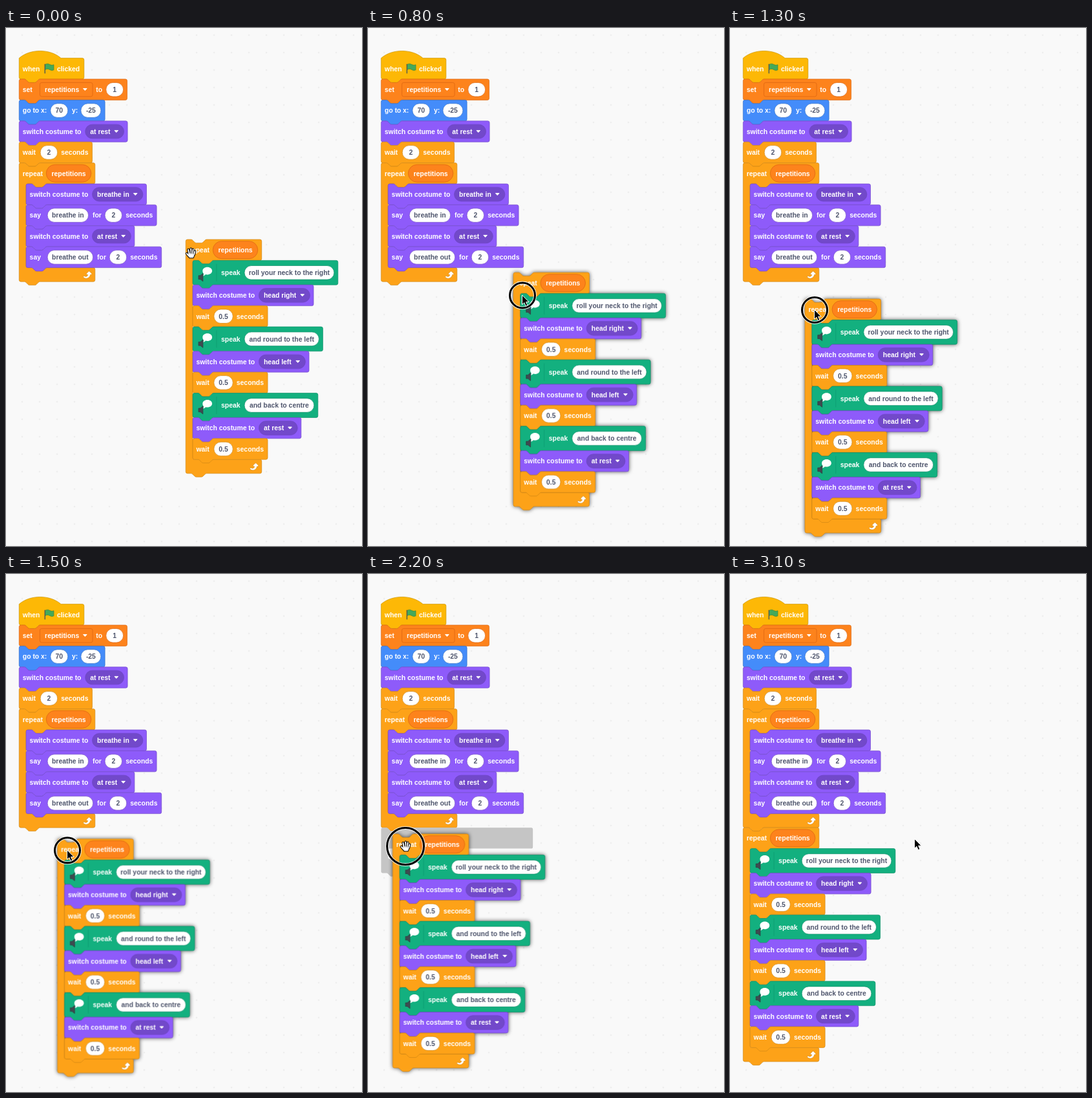
An HTML page that plays this animation: 551x801 px, repeating every 3700 ms.

```html
<!DOCTYPE html>
<html lang="en">
<head>
<meta charset="utf-8">
<title>Block scripts</title>
<style>
html, body { margin: 0; width: 100%; height: 100%; overflow: hidden; background: #f9f9f9; }
svg { display: block; width: 551px; height: 801px; }
text { font: bold 10.4px "Liberation Sans", Arial, sans-serif; fill: #fff; }
.dark { fill: #4f566d; }
.mid { text-anchor: middle; }
.lifted { filter: drop-shadow(0 0 3px rgba(0,0,0,.65)); }
</style>
</head>
<body>
<svg id="stage" viewBox="0 0 551 801" xmlns="http://www.w3.org/2000/svg"></svg>
<script>
const LOOP = 3700, STEP = 100, SCALE = 0.675;
const ROW = 48 * SCALE, TALL = 56 * SCALE, FOOT = 32 * SCALE, INDENT = 16 * SCALE;

// fill, outline
const colors = {
  event: ['#fdb806', '#c99200'],
  data: ['#fd831c', '#da6410'],
  motion: ['#448cfa', '#306dc6'],
  looks: ['#8e5bfa', '#7048c8'],
  control: ['#fda218', '#cf8616'],
  voice: ['#13b07f', '#0b8c66']
};

// Block outlines, in block units
const notchIn = 'c2,0 3,1 4,2l4,4c1,1 2,2 4,2h12c2,0 3,-1 4,-2l4,-4c1,-1 2,-2 4,-2';
const notchOut = 'c-2,0 -3,1 -4,2l-4,4c-1,1 -2,2 -4,2h-12c-2,0 -3,-1 -4,-2l-4,-4c-1,-1 -2,-2 -4,-2';
const topEdge = `M0,4A4,4 0 0,1 4,0H12${notchIn}`;
const hatEdge = 'M0,0c25,-22 71,-22 96,0';
const rightSide = (w, h) => `H${w - 4}a4,4 0 0,1 4,4v${h - 8}a4,4 0 0,1 -4,4`;
const bottomEdge = `H48${notchOut}H4a4,4 0 0,1 -4,-4z`;
const stackPath = (w, h, top = topEdge) => top + rightSide(w, h) + bottomEdge;
const loopPath = (w, mouth) => topEdge + rightSide(w, 48) +
  `H64${notchOut}h-8a4,4 0 0,0 -4,4v${mouth - 8}a4,4 0 0,0 4,4` +
  rightSide(w, 32) + bottomEdge;

const shape = (d, [fill, line]) =>
  `<path d="${d}" transform="scale(${SCALE})" fill="${fill}" stroke="${line}"/>`;
const at = (x, y, body) => `<g transform="translate(${x} ${y})">${body}</g>`;
const label = (x, s, cls = '') => `<text x="${x}" y="3.7" class="${cls}">${s}</text>`;
const capsule = (x, w, h, [fill, line], r = h / 2) =>
  `<rect x="${x}" y="${-h / 2}" width="${w}" height="${h}" rx="${r}" fill="${fill}" stroke="${line}" stroke-width=".7"/>`;
const input = (x, w, s, kind) =>
  capsule(x, w, 21.6, ['#fff', colors[kind][1]]) + label(x + w / 2, s, 'dark mid');
const caret = x =>
  `<path d="M${x - 2.8},-1.6h5.6l-2.8,3z" fill="#fff" stroke="#fff" stroke-linejoin="round"/>`;
const menu = (x, w, s, look, r) =>
  capsule(x, w, 21.6, look, r) + label(x + 7.6, s) + caret(x + w - 11.7);

const block = (kind, w, body, h = ROW, top) => ({
  h, svg: shape(stackPath(w / SCALE, h / SCALE, top), colors[kind]) + at(0, h / 2, body)
});

function stack(blocks) {
  let y = 0, svg = '';
  for (const b of blocks) {
    svg += at(0, y, b.svg);
    y += b.h;
  }
  return { h: y, svg };
}

const flag = '<path d="M40.2-6.2c3-2 5.4-1.2 7.4 0 2 1 4 1.1 6 .2v8c-2 1-4 .8-6-.2-2-1.2-4.4-2-7.4 0z" fill="#45a95a" stroke="#3d8a3c" stroke-width=".8"/>' +
  '<path d="M40-6.6V7" stroke="#4f5b50" stroke-width="1.4" stroke-linecap="round"/>';
const turn = '<path transform="scale(.675)" fill="#fff" stroke="#cf8616" stroke-width=".9" d="M23.3,11c-.3,.6-.9,1-1.5,1h-1.6c-.1,1.3-.5,2.5-1.1,3.6c-.9,1.7-2.3,3.2-4.1,4.1c-1.7,.9-3.6,1.2-5.5,.9c-1.8-.3-3.5-1.1-4.9-2.3c-.7-.7-.7-1.9,0-2.6c.6-.6,1.6-.7,2.3-.2c.9,.6,2,.9,3,.9s1.9-.3,2.7-.9c1.1-.8,1.8-2.1,1.8-3.5h-1.5c-.9,0-1.7-.7-1.7-1.7c0-.4,.2-.9,.5-1.2l4.4-4.4c.7-.6,1.7-.6,2.4,0l4.5,4.5c.5,.5,.6,1.2,.3,1.8z"/>';
const talk = '<path d="M22.7-8.6c4.3 0 7.3 2.5 7.3 5.9s-3 5.8-7.3 5.8c-1 0-2-.1-2.8-.4-1 1.3-2.4 2.2-4 2.4.8-1 1.1-2.2.9-3.5-1-1.1-1.5-2.6-1.5-4.3 0-3.4 3.1-5.9 7.4-5.9z" fill="#fff"/>' +
  '<path d="M9 4.5h2.8l4-3.4v12.3l-4-3.2H9z" fill="#3f4a50" stroke="#2e383d" stroke-width=".7" stroke-linejoin="round"/>' +
  '<path d="M36.9-13.5v27" stroke="#0e9c72" stroke-width=".8"/>';

const costume = (w, s) => block('looks', w,
  label(5.5, 'switch costume to') + menu(102.4, w - 108, s, ['#7249ca', '#6d45c4']));
const wait = (w, s, pill) => block('control', w,
  label(5.5, 'wait') + input(32.8, pill, s, 'control') + label(38.4 + pill, 'seconds'));
const say = (w, s, pill) => block('looks', w,
  label(5.5, 'say') + input(33, pill, s, 'looks') + label(39.4 + pill, 'for') +
  input(58.4 + pill, 26.6, '2', 'looks') + label(90.6 + pill, 'seconds'));
const speak = (w, s) => block('voice', w,
  talk + label(44, 'speak') + input(80, w - 86, s, 'voice'), TALL);

function repeat(inner) {
  const kids = stack(inner), w = 117.5;
  return {
    h: ROW + kids.h + FOOT,
    svg: shape(loopPath(w / SCALE, kids.h / SCALE), colors.control) +
      at(0, ROW / 2, label(5.5, 'repeat') + capsule(42, 69.5, 27, colors.data) +
        label(76.8, 'repetitions', 'mid')) +
      at(INDENT, ROW, kids.svg) + at(96.6, ROW + kids.h + 2.7, turn)
  };
}

const mainScript = stack([
  block('event', 100.5, label(5.5, 'when') + flag + label(58.6, 'clicked'), ROW, hatEdge),
  block('data', 167.2, label(5.5, 'set') +
    menu(32.2, 81.5, 'repetitions', colors.data, 2.7) +
    label(118.9, 'to') + input(134.5, 26.8, '1', 'data')),
  block('motion', 132.8, label(5.5, 'go to x:') + input(48.5, 27, '70', 'motion') +
    label(81.6, 'y:') + input(95.6, 31, '-25', 'motion')),
  costume(167.8, 'at rest'),
  wait(113.2, '2', 26.6),
  repeat([
    costume(186.4, 'breathe in'),
    say(202, 'breathe in', 63.5),
    costume(167.8, 'at rest'),
    say(209.6, 'breathe out', 70.6)
  ])
]);

const neckLoop = repeat([
  speak(224.8, 'roll your neck to the right'),
  costume(187, 'head right'),
  wait(116, '0.5', 29.4),
  speak(201.4, 'and round to the left'),
  costume(180, 'head left'),
  wait(116, '0.5', 29.4),
  speak(193.8, 'and back to centre'),
  costume(167.8, 'at rest'),
  wait(116, '0.5', 29.4)
]);

const fingers = 'M-2.2,1L-3.8,-5.2M.4,0L.2,-6.6M3,0L3.6,-5.6M5.2,2L6.3,-2.6M-3.2,4.4L-6.2,.8';
const palm = 'M-3,0H5.4L4.8,4L3.6,7H-1.8L-4,3.6Z';
const stroke = (d, color, w) =>
  `<path d="${d}" fill="${color}" stroke="${color}" stroke-width="${w}" stroke-linecap="round" stroke-linejoin="round"/>`;
const hand = stroke(fingers, '#000', 3.9) + stroke(palm, '#000', 2.6) +
  stroke(fingers, '#fff', 1.9) + stroke(palm, '#fff', .6) +
  '<path d="M-.9,1.5V-2M1.7,1.5V-2M4.2,2V-1" stroke="#000" stroke-width=".7"/>';
const arrow = '<path d="M-.5,-.5V14.2L2.9,11.2L5.2,16.6L7.9,15.5L5.6,10.2H10.2Z" fill="#000" stroke="#fff" stroke-width="1"/>';

const home = [20.3, 46.6 + mainScript.h];
const stage = document.getElementById('stage');
stage.innerHTML = `
  <defs><pattern id="grid" x="11.5" y="-2.5" width="27" height="27" patternUnits="userSpaceOnUse">
    <rect x="12.8" y="12.8" width="1.4" height="1.4" fill="#dadada"/></pattern></defs>
  <rect width="551" height="801" fill="#f9f9f9"/>
  <rect width="551" height="801" fill="url(#grid)"/>
  ${at(20.3, 46.6, mainScript.svg)}
  <g id="marker" transform="translate(${home})">${shape(loopPath(348, 24), ['#c5c5c5', 'none'])}</g>
  <g id="drag">${neckLoop.svg}</g>
  <g id="ring" fill="none"><circle stroke="#fff" stroke-opacity=".8" stroke-width="5"/><circle stroke="#000" stroke-width="3"/></g>
  <g id="pointer"><g id="hand">${hand}</g><g id="arrow">${arrow}</g></g>`;

const el = id => document.getElementById(id);
const [marker, drag, ring, pointer, handIcon, arrowIcon] =
  ['marker', 'drag', 'ring', 'pointer', 'hand', 'arrow'].map(el);
const circles = ring.querySelectorAll('circle');

// time, x, y
const pointerPath = [
  [0, 286, 348], [300, 291, 347], [400, 291, 347], [500, 292, 350], [600, 291, 378],
  [1000, 187, 449], [1300, 131, 436], [1600, 77, 423], [1700, 65, 422],
  [2000, 58, 421], [2700, 58, 421], [3100, 286, 410]
];
const dragPath = [
  [0, 278.2, 327], [600, 278.2, 327], [1000, 171.8, 429.2], [1300, 116, 419],
  [1600, 61.5, 405], [1700, 49.3, 403], [2000, 38.3, 402], [2300, 38.3, 402], [2400, ...home]
];

function along(path, t) {
  const i = path.findIndex(p => p[0] > t);
  if (i < 0) return path[path.length - 1].slice(1);
  const [t0, x0, y0] = path[i - 1], [t1, x1, y1] = path[i];
  const k = (t - t0) / (t1 - t0);
  return [x0 + (x1 - x0) * k, y0 + (y1 - y0) * k];
}

const show = (node, on) => node.setAttribute('display', on ? 'inline' : 'none');
const move = (node, p) => node.setAttribute('transform', `translate(${p})`);

function draw(t) {
  const p = along(pointerPath, t);
  const release = Math.max(0, (t - 2200) / STEP);
  const radius = t < 1700 ? 19.5 : 28.5 + 2 * release;
  const isArrow = (t >= 500 && t < 1700) || t >= 2800;
  move(drag, along(dragPath, t));
  drag.setAttribute('class', t > 600 && t < 2400 ? 'lifted' : '');
  show(marker, t >= 1700 && t < 2400);
  show(ring, t >= 500 && t < 2600);
  ring.setAttribute('opacity', Math.max(0, 1 - release / 4));
  circles.forEach(c => c.setAttribute('r', radius));
  move(ring, p);
  move(pointer, p);
  show(handIcon, !isArrow);
  show(arrowIcon, isArrow);
}

const start = performance.now();
function tick() {
  const t = (performance.now() - start) % LOOP;
  draw(Math.floor(t / STEP) * STEP);
  requestAnimationFrame(tick);
}
tick();
</script>
</body>
</html>
```
